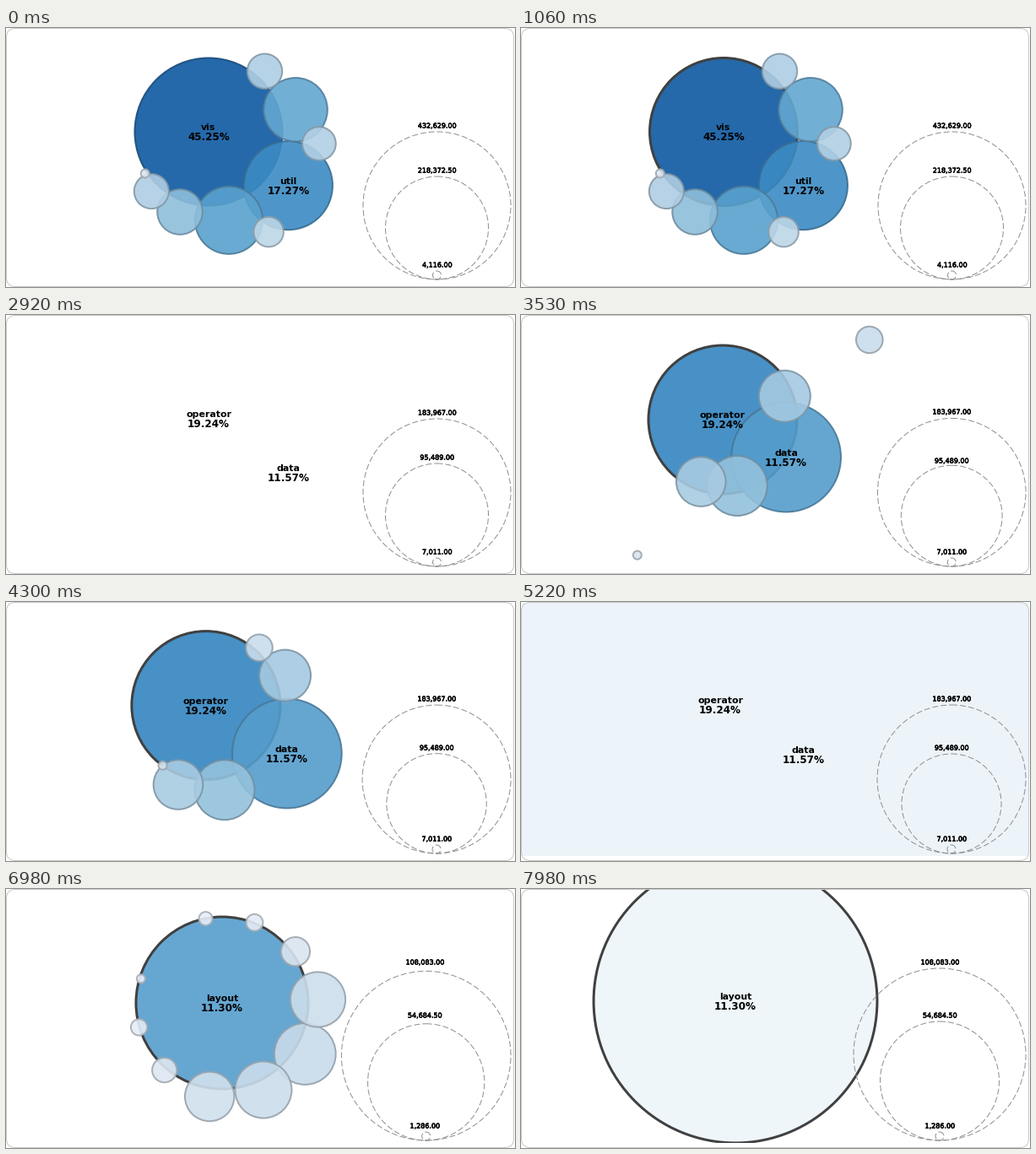
Recreate the animation shown at these times as a matplotlib script. Size 603 px wide and 307 px high, loop 8 s.

```python
import numpy as np
import matplotlib.pyplot as plt
from matplotlib.animation import FuncAnimation
from matplotlib.patches import Circle, FancyBboxPatch, Rectangle
from matplotlib.patheffects import withStroke

W, H = 603, 307
INTERVAL, FRAMES = 40, 200
STEP = 77            # the chart redraws in coarse ticks
TICKS = 10           # ticks in one tween
NEVER = 10 ** 6
HOVER_START = 910
TOTAL = 956129       # value that stands for 100 %
MIN_R = 5
ALPHA = 0.9
HOVER_INK = np.array([64, 64, 64]) / 255

# fill colour by share of the total, in percent
SHARES = (0.1, 0.5, 2.5, 4.6, 10.5, 19, 45)
BLUES = np.array([(237, 243, 252), (222, 232, 242), (196, 218, 234),
                  (158, 199, 224), (105, 170, 211), (72, 146, 199),
                  (37, 106, 170)]) / 255

# slots: side of the ring each further bubble joins, d(own) or u(p),
# or an outer pocket, r(ight) or b(ottom)
RING = "dudududud"
SCENES = [
    dict(enter=None, settle=None, zoom=1910, full=2460, names=("vis", "util"),
         values=(432629, 165157, 100024, 89721, 48716, 31294, 30934, 29284,
                 24254, 4116),
         home=(240, 123), drift=(240, 123), radius=87.5, mid_radius=61,
         lean=34, min_step=0, slots="dududrbd", waiting=()),
    dict(enter=2920, settle=3760, zoom=4610, full=5220,
         names=("operator", "data"), label_end=5530,
         values=(183967, 110625, 44300, 36000, 34100, 16540, 7011),
         home=(236, 122), drift=(239, 124), radius=88, mid_radius=59,
         lean=30.7, min_step=0, slots=RING,
         waiting=((397, 38), (147, 270))),
    dict(enter=5680, settle=6520, zoom=7370, full=NEVER, names=("layout",),
         values=(108083, 17057, 14897, 14219, 11893, 5248, 4190, 2581, 2490,
                 2023, 1286),
         home=(254, 133), drift=(259, 138), radius=102, mid_radius=70.5,
         lean=31.6, min_step=33, slots=RING,
         waiting=((442, 50), (165, 195), (71, 21), (116, 105))),
]

fig = plt.figure(figsize=(W / 72, H / 72), dpi=72, facecolor="white")
ax = fig.add_axes([0, 0, 1, 1])
ax.set_xlim(0, W)
ax.set_ylim(H, 0)
ax.axis("off")
ax.add_patch(FancyBboxPatch((0.5, 0.5), 601, 306, fc="none", ec="#c8c8c8",
                            lw=1, boxstyle="round,pad=0,rounding_size=10.5",
                            zorder=4))
plot_area = Rectangle((1, 1), 600, 300, transform=ax.transData)
drawn = []


def lerp(a, b, t):
    return np.asarray(a, float) * (1 - t) + np.asarray(b, float) * t


def tick(t, start):
    return int((t - start) // STEP)


def tween(t, start):
    return float(np.clip(tick(t, start) / TICKS, 0, 1))


def scaled_radii(values, largest):
    roots = np.sqrt(values)
    return np.interp(roots, (roots[-1], roots[0]), (MIN_R, largest))


def share_rgb(value):
    share = 100 * value / TOTAL
    return np.array([np.interp(share, SHARES, BLUES[:, c]) for c in range(3)])


def corner(a, b, c):
    """Angle between sides a and b of a triangle, opposite to side c."""
    return np.arccos(np.clip((a * a + b * b - c * c) / (2 * a * b), -1, 1))


def pocket(p, q, a, b):
    """Point at distance a from p and b from q, on the outer side."""
    span = q - p
    turn = corner(a, np.hypot(*span), b)
    base = np.arctan2(span[1], span[0])
    spots = [p + a * np.array([np.cos(base + s * turn), np.sin(base + s * turn)])
             for s in (1, -1)]
    return max(spots, key=lambda s: np.hypot(*s))


def pack(r, slots, lean, min_step):
    """Offsets of the bubbles set around the rim of the largest one."""
    dist = r[0] + np.minimum(r / 2, 27)
    angle = {1: np.radians(lean)}
    last = {"d": 1, "u": 1}
    spots = [np.zeros(2), dist[1] * np.array([np.cos(angle[1]), np.sin(angle[1])])]
    for i, slot in zip(range(2, len(r)), slots):
        if slot in last:
            j = last[slot]
            gap = (r[i] + r[j]) * (0.88 if slot == "d" else 1)
            step = max(corner(dist[i], dist[j], gap), np.radians(min_step))
            angle[i] = angle[j] + (step if slot == "d" else -step)
            last[slot] = i
            spots.append(dist[i] * np.array([np.cos(angle[i]), np.sin(angle[i])]))
        else:
            k = 3 if slot == "r" else 2
            spots.append(pocket(spots[1], spots[k],
                                0.85 * (r[1] + r[i]), 0.85 * (r[k] + r[i])))
    return np.array(spots)


for scene in SCENES:
    scene["r"] = scaled_radii(scene["values"], scene["radius"])
    scene["spots"] = pack(scene["r"], scene["slots"], scene["lean"],
                          scene["min_step"])


def add_patch(patch):
    ax.add_patch(patch)
    patch.set_clip_path(plot_area)
    drawn.append(patch)


def bubble(pos, r, value, fill=ALPHA, stroke=0.9, hover=0.0):
    if r < 0.5 or (fill <= 0 and stroke <= 0):
        return
    shown = share_rgb(value)
    paint = np.clip((shown - (1 - ALPHA)) / ALPHA, 0, 1)
    ink = lerp(shown * 0.72, HOVER_INK, hover)
    add_patch(Circle(pos, r, fc=(*paint, fill),
                     ec=(*ink, stroke + (1 - stroke) * hover),
                     lw=2 + hover, zorder=2))


def text(x, y, s, **style):
    drawn.append(ax.text(x, y, s, ha="center", va="baseline", color="black",
                         family="DejaVu Sans", zorder=5, **style))


def label(pos, name, value):
    x, y = pos
    text(x, y - 2, name, size=11, weight="bold")
    text(x, y + 10, f"{100 * value / TOTAL:.2f}%", size=12, weight="bold")


def legend(radii, text_radii, values):
    right, bottom = 598, 298
    ticks = (values[0], (values[0] + values[-1]) / 2, values[-1])
    for r in (*radii, MIN_R):
        add_patch(Circle((right - radii[0], bottom - r), r, fc="none",
                         ec="#8f8f8f", lw=1, ls=(0, (7, 3)), zorder=3))
    for r, v in zip((*text_radii, MIN_R), ticks):
        text(right - text_radii[0], bottom - 2 * r - 4.5, f"{v:,.2f}", size=8,
             path_effects=[withStroke(linewidth=0.6, foreground="black")])


def placement(sc, before, a, b):
    """Bubble centres after the parts a of entering and b of settling."""
    spread = 0.9 * a ** 0.76 + 0.1 * b
    centre = lerp(lerp(before["home"], sc["drift"], min(1, a / 0.5)),
                  sc["home"], b)
    points = centre + spread * sc["spots"]
    first = len(points) - len(sc["waiting"])
    for i, wait in enumerate(sc["waiting"], first):
        away = np.subtract(wait, sc["drift"])
        flying = sc["drift"] + away * (1.5 - 0.5 * a)
        points[i] = lerp(flying, points[i], min(1, b / 0.6))
    return points


def draw(i):
    while drawn:
        drawn.pop().remove()
    t = i * INTERVAL + 30
    n = max(k for k, s in enumerate(SCENES) if (s["enter"] or 0) <= t)
    sc, before = SCENES[n], SCENES[max(0, n - 1)]
    a, b = (tween(t, sc["enter"]), tween(t, sc["settle"])) if n else (1, 1)
    points = placement(sc, before, a, b)
    arrive = min(1, a / 0.5)
    zooming, full = t >= sc["zoom"], t >= sc["full"]

    if full:
        tint = lerp((1, 1, 1), share_rgb(sc["values"][0]), 0.1)
        add_patch(Rectangle((1, 1), 600, 300, lw=0, fc=tint, zorder=1))
    else:
        k = max(0, tick(t, sc["zoom"]))
        fade = max(0, 1 - (k + 1) / 3) if zooming else 1
        hover = 1 if n else np.clip((tick(t, HOVER_START) + 1) / 3, 0, 1)
        bubble(points[0], sc["r"][0] * arrive * (1 + 0.1225 * k ** 0.8),
               sc["values"][0], fill=lerp(0.09, ALPHA, fade), hover=hover)
        for pos, r, v in zip(points[1:], sc["r"][1:], sc["values"][1:]):
            bubble(pos, r * arrive, v, ALPHA * fade, 0.9 * fade)

    # captions glide over from the bubbles of the scene before
    for j, name in enumerate(sc["names"]):
        if j and (zooming and not full or t >= sc.get("label_end", NEVER)):
            continue
        old = np.add(before["home"], before["spots"][j])
        label(lerp(old, points[j], arrive), name, sc["values"][j])

    old, new = [(s["radius"], s["mid_radius"]) for s in (before, sc)]
    legend(lerp(old, new, 0.7 * a + 0.3 * b), new if a > 0 else old,
           sc["values"])
    return drawn


anim = FuncAnimation(fig, draw, frames=FRAMES, interval=INTERVAL,
                     init_func=lambda: [], repeat=True, repeat_delay=0,
                     blit=False)
plt.show()
```
